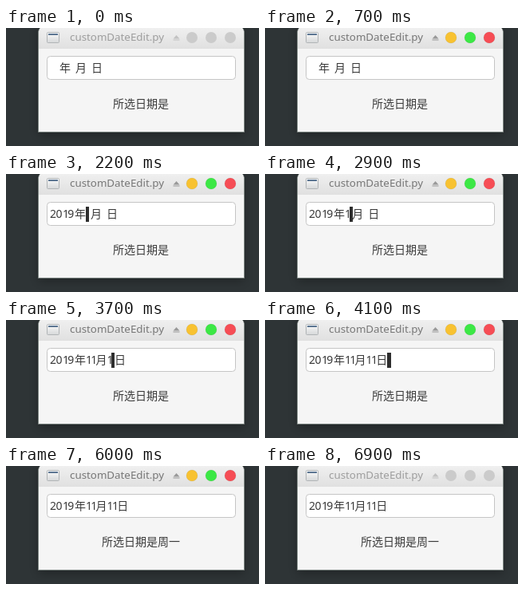
An HTML page that plays this animation: 317x148 px, repeating every 7.2 s.

```html
<!DOCTYPE html>
<html lang="zh-CN">
<head>
<meta charset="utf-8">
<title>customDateEdit.py</title>
<style>
  html, body { margin: 0; width: 100%; height: 100%; overflow: hidden; background: #2e3436; }
  svg { display: block; width: 317px; height: 148px; }
  text { font: 14px "Noto Sans", "Noto Sans CJK SC", sans-serif; fill: #3a3a3a; white-space: pre; }
  #title { font-size: 13.33px; fill: #9e9e9e; }
  .eject { fill: #c2c2c2; }
  .dot { fill: #cbcbcb; }
  .active #title { fill: #777; }
  .active .eject { fill: #999; }
  .active .dot { stroke: #0001; }
  .active .min { fill: #f8c231; }
  .active .max { fill: #3ce845; }
  .active .close { fill: #f64d55; }
</style>
</head>
<body>
<svg id="stage" viewBox="0 0 317 148">
  <defs>
    <linearGradient id="bar" x2="0" y2="1">
      <stop stop-color="#f0f0f0"/>
      <stop offset="1" stop-color="#e0e0e0"/>
    </linearGradient>
    <linearGradient id="pane" x2="0" y2="1">
      <stop stop-color="#fbfbfb"/>
      <stop offset="1" stop-color="#d6d8d9"/>
    </linearGradient>
    <filter id="soft" x="-20%" y="-20%" width="140%" height="140%">
      <feGaussianBlur stdDeviation="6"/>
    </filter>
  </defs>
  <rect width="317" height="148" fill="#2e3436"/>
  <rect x="41" y="0" width="257" height="134" fill="#000" opacity=".3" filter="url(#soft)"/>
  <path d="M40.5 130.5V5Q41 1 44 -1H295Q298 1 298.5 5V130.5Z" fill="#f5f5f5" stroke="#7c8582"/>
  <path d="M41 26V5Q41.5 1 44 -1H295Q297.5 1 298 5V26Z" fill="url(#bar)"/>

  <rect x="51.5" y="5.5" width="15" height="13" rx="1" fill="url(#pane)" stroke="#b0b4b6"/>
  <rect x="53" y="7" width="12" height="2" fill="#5c7693"/>

  <text id="title" x="80" y="16">customDateEdit.py</text>
  <path class="eject" d="M213.5 9L217.5 13.5H209.5ZM209.5 14.5H217.5V15.5H209.5Z"/>
  <circle class="dot min" cx="233" cy="12" r="7"/>
  <circle class="dot max" cx="257" cy="12" r="7"/>
  <circle class="dot close" cx="281" cy="12" r="7"/>

  <rect x="51.5" y="35.5" width="236" height="29" rx="4" fill="#fff" stroke="#c5c5c5"/>
  <text id="field" y="55" xml:space="preserve"></text>
  <rect id="caret" y="41" height="19" fill="#2e2e2e"/>
  <text id="result" x="169" y="100" text-anchor="middle"></text>
</svg>
<script>
  const LOOP = 7200, LEFT = 55, FOCUS = 200, BLUR = 6900, ANSWER = 5500;
  const MASK = "____年__月__日", DIGITS = "20191111";
  const KEYS = [1200, 1600, 2000, 2200, 2900, 3200, 3700, 4100];
  const BLINKS = [FOCUS, 700, 1100, 4700, 5100, 6000, 6500, BLUR];
  const ADVANCE = { " ": 3, 0: 8.5, 1: 6.3, 2: 7.5, 9: 8.7 };

  const [stage, field, caret, result] =
    ["stage", "field", "caret", "result"].map(id => document.getElementById(id));
  const passed = (times, t) => times.filter(at => at <= t).length;

  function fillMask(typed) {
    let slot = 0;
    return MASK.replace(/_/g, () => slot < typed ? DIGITS[slot++] : " ");
  }

  function show(t) {
    const text = fillMask(passed(KEYS, t));
    const xs = [LEFT];
    for (const ch of text) xs.push(xs.at(-1) + (ADVANCE[ch] ?? 14));
    field.textContent = text;
    field.setAttribute("x", xs.slice(0, -1).map(x => x.toFixed(1)).join(" "));

    // The caret skips the fixed date marks to the next empty slot.
    const gap = text.indexOf(" ");
    caret.setAttribute("x", Math.floor(xs.at(gap) + 0.01));
    caret.setAttribute("width", gap < 0 ? 5 : 4);
    caret.setAttribute("visibility", passed(BLINKS, t) % 2 ? "visible" : "hidden");

    stage.classList.toggle("active", t >= FOCUS && t < BLUR);
    result.textContent = "所选日期是" + (t >= ANSWER ? "周一" : "");
  }

  function tick() {
    show(performance.now() % LOOP);
    requestAnimationFrame(tick);
  }
  tick();
</script>
</body>
</html>
```
